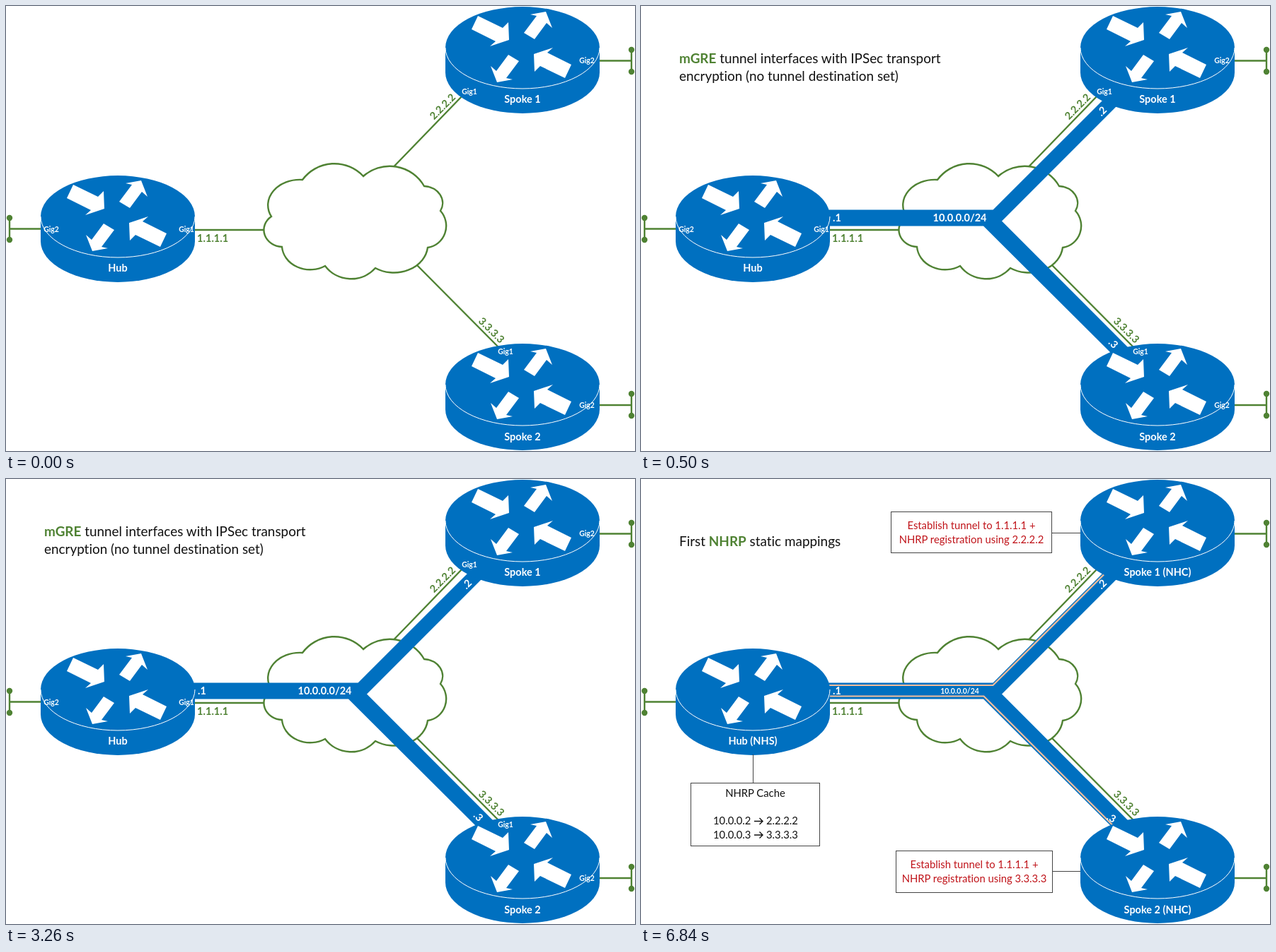
An HTML page that plays this animation: 889x630 px, repeating every 8 s.

```html
<!DOCTYPE html>
<html lang="en">
<head>
<meta charset="utf-8">
<title>Hub and spoke tunnels</title>
<style>
  html, body { margin: 0; width: 100%; height: 100%; overflow: hidden; background: #fff; }
  svg { display: block; width: 100%; height: 100%; }
  text { font: 14.8px Lato, Carlito, sans-serif; font-variant-ligatures: none; fill: #111; }
  .bold, .label, .port, .ip { font-weight: 700; }
  .label { font-size: 14.5px; fill: #fff; }
  .port { font-size: 10.4px; fill: #fff; }
  .ip { font-size: 14.6px; }
  .title { font-size: 18.9px; }
  .mid { text-anchor: middle; }
  .red text { fill: #c0141a; }
  .green, .ip { fill: #4f8233; }
  .blue { fill: #0070c0; }
  .wire { fill: none; stroke: #4f8233; stroke-width: 2.4; }
  .note { fill: #fff; stroke: #444; stroke-width: 1; }
  .flow { fill: none; stroke: #f2bd9c; stroke-width: 2.2; }

  /* Hard cuts at 500 ms and 5100 ms of the 8 s loop */
  .pipe, .tunnel, .nhrp, .ports { animation: 8s step-end infinite; }
  .pipe { animation-name: pipe; }
  .tunnel { animation-name: tunnel; }
  .nhrp { animation-name: nhrp; }
  .ports { animation-name: ports; }
  @keyframes pipe { 0% { visibility: hidden } 6.25%, 100% { visibility: visible } }
  @keyframes tunnel { 0% { visibility: hidden } 6.25% { visibility: visible } 63.75%, 100% { visibility: hidden } }
  @keyframes nhrp { 0% { visibility: hidden } 63.75%, 100% { visibility: visible } }
  @keyframes ports { 0% { visibility: visible } 63.75%, 100% { visibility: hidden } }
</style>
</head>
<body>
<svg viewBox="0 0 889 630">
  <defs>
    <path id="arrows" fill="#fff" d="M95 253L130 270 138 262 139 287 112 296 120 289 86 272zM160 277L178 253 169 251 191 247 200 270 192 263 175 286z"/>
    <g id="router">
      <path class="blue" d="M49 298a109 58 0 0 1 218 0v35a109 58 0 0 1-218 0z"/>
      <path d="M49 298a109 58 0 0 0 218 0" fill="none" stroke="#fff" stroke-width="1"/>
      <use href="#arrows"/>
      <use href="#arrows" transform="rotate(180 156.5 297)"/>
    </g>
    <g id="lan">
      <path class="wire" d="M0-15.5V15.5"/>
      <circle class="green" cy="-15.5" r="4.2"/>
      <circle class="green" cy="15.5" r="4.2"/>
    </g>
    <path id="maps-to" d="M0 0H12M7.5-4.5L12 0 7.5 4.5" fill="none" stroke="#111" stroke-width="1.4"/>
  </defs>

  <path class="wire" d="M5 315.5H52M262 317H366M548 227.5L648 124M581 367L700 487M836 77.5H884M836 565H884"/>
  <use href="#lan" x="5" y="315.5"/>
  <use href="#lan" x="884" y="77.5"/>
  <use href="#lan" x="884" y="564.5"/>

  <path class="wire" style="fill:#fff" d="M375 298A45 36 0 0 1 419 246A56 56 0 0 1 505 241A56 56 0 0 1 591 255A28 24 0 0 1 614 290A30 31 0 0 1 596 342A48 40 0 0 1 522 371A46 46 0 0 1 451 368A40 35 0 0 1 390 341A27 24 0 0 1 375 298z"/>

  <path class="blue pipe" d="M255 288.5H497.5L652 134 680 134 510 304.5 692 487 674 501 484 311.5H255z"/>
  <path class="flow nhrp" d="M260 292H497.5L656 133.5M260 307.5H484.5L672 495.5"/>

  <use href="#router"/>
  <use href="#router" x="572" y="-239"/>
  <use href="#router" x="572" y="238"/>

  <text class="ip" x="270" y="334">1.1.1.1</text>
  <text class="ip mid" transform="translate(617 142.5) rotate(-45)" y="5">2.2.2.2</text>
  <text class="ip mid" transform="translate(686 459) rotate(45)" y="5">3.3.3.3</text>

  <g class="ports">
    <g class="mid">
      <text class="port" x="64" y="320">Gig2</text>
      <text class="port" x="255" y="320">Gig1</text>
      <text class="port" x="655" y="125">Gig1</text>
      <text class="port" x="821" y="81">Gig2</text>
      <text class="port" x="706" y="493">Gig1</text>
      <text class="port" x="821" y="568.5">Gig2</text>
    </g>
    <text class="label mid" x="158" y="376">Hub</text>
    <text class="label mid" x="730" y="136.5">Spoke 1</text>
    <text class="label mid" x="730" y="614.5">Spoke 2</text>
  </g>

  <g class="pipe">
    <text class="label" x="271" y="305">.1</text>
    <text class="label mid" transform="translate(651.5 149) rotate(-45)" y="5">.2</text>
  </g>

  <g class="tunnel">
    <text class="title" x="54" y="80.5"><tspan class="bold green">mGRE</tspan> tunnel interfaces with IPSec transport</text>
    <text class="title" x="54" y="105.5">encryption (no tunnel destination set)</text>
    <text class="label mid" x="450.5" y="305">10.0.0.0/24</text>
    <text class="label mid" transform="translate(667.5 478) rotate(45)" y="5">.3</text>
  </g>

  <g class="nhrp">
    <text class="title" x="54" y="94.5">First <tspan class="bold green">NHRP</tspan> static mappings</text>
    <text class="port mid" x="450.5" y="303.5">10.0.0.0/24</text>
    <text class="label mid" transform="translate(665 480) rotate(30)" y="5">.3</text>
    <text class="label mid" x="158" y="376">Hub (NHS)</text>
    <text class="label mid" x="730" y="136.5">Spoke 1 (NHC)</text>
    <text class="label mid" x="730" y="614.5">Spoke 2 (NHC)</text>

    <path class="note" d="M580.5 76.5H621M581.5 555.5H621M158.5 390V430"/>
    <rect class="note" x="353.5" y="46.5" width="227" height="58"/>
    <rect class="note" x="360.5" y="526.5" width="221" height="59"/>
    <rect class="note" x="70.5" y="430.5" width="182" height="89"/>

    <g class="mid red">
      <text x="467" y="71">Establish tunnel to 1.1.1.1 +</text>
      <text x="467" y="90.5">NHRP registration using 2.2.2.2</text>
      <text x="471" y="551">Establish tunnel to 1.1.1.1 +</text>
      <text x="471" y="570.5">NHRP registration using 3.3.3.3</text>
    </g>
    <text class="mid" x="161.5" y="450">NHRP Cache</text>
    <text x="102" y="489">10.0.0.2</text>
    <use href="#maps-to" x="160" y="484.5"/>
    <text x="177" y="489">2.2.2.2</text>
    <text x="102" y="508.5">10.0.0.3</text>
    <use href="#maps-to" x="160" y="504"/>
    <text x="177" y="508.5">3.3.3.3</text>
  </g>
</svg>
</body>
</html>
```
